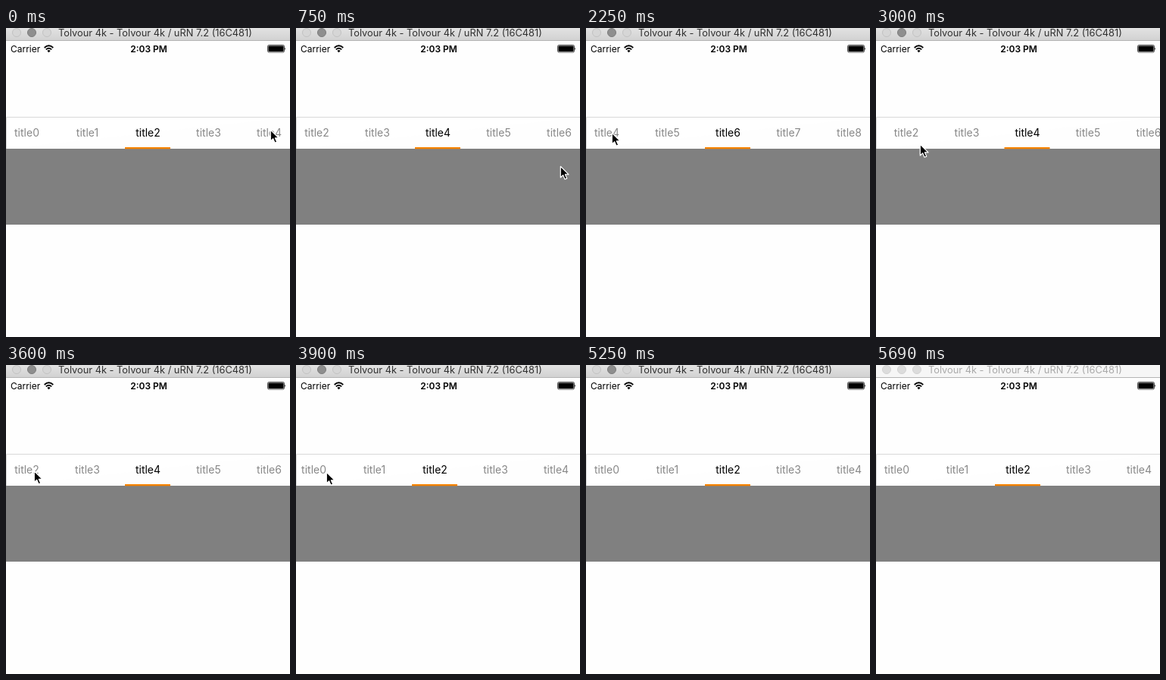
These frames come from a looping animation (375 by 407 pixels, 5.79 s). An HTML page:

```html
<!DOCTYPE html>
<html lang="en">
<head>
<meta charset="utf-8">
<title>Scrolling tabs</title>
<style>
  html, body { margin: 0; width: 100%; height: 100%; overflow: hidden; background: #fefefe; }
  svg { display: block; width: 375px; height: 407px; font-family: Inter, Roboto, sans-serif; }
  #tabs text { font-size: 14px; fill: #888; text-anchor: middle; }
  #tabs text.on { fill: #000; }
  #bar rect { fill: url(#chrome); }
  #bar text { font-size: 12.8px; fill: #303030; }
  #bar circle { fill: #d6d6d6; stroke: #c2c2c2; }
  #bar circle.mid { fill: #8e8e8e; stroke: #7c7c7c; }
  #bar.idle rect { fill: #f6f6f6; }
  #bar.idle text { fill: #a9a9a9; }
  #bar.idle circle { fill: #dcdcdc; stroke: #d2d2d2; }
</style>
</head>
<body>
<svg viewBox="0 0 375 407">
  <defs>
    <linearGradient id="chrome" x2="0" y2="1">
      <stop stop-color="#e2e2e2"/><stop offset="1" stop-color="#d2d2d2"/>
    </linearGradient>
  </defs>
  <rect width="375" height="407" fill="#fefefe"/>

  <g id="bar">
    <rect width="375" height="16"/>
    <circle cx="14" cy="6" r="5.5"/>
    <circle cx="34" cy="6" r="5.5" class="mid"/>
    <circle cx="54" cy="6" r="5.5"/>
    <text x="69" y="11">Tolvour 4k - Tolvour 4k / uRN 7.2 (16C481)</text>
    <path d="M0 16.5H375" stroke="#b4b4b4"/>
  </g>

  <g font-size="12">
    <text x="6" y="32">Carrier</text>
    <text x="188.5" y="32" text-anchor="middle" font-weight="600">2:03 PM</text>
    <g fill="none" stroke="#000" stroke-width="1.8">
      <path d="M50.7 26Q56.5 20.6 62.3 26M52.8 28.4Q56.5 25 60.2 28.4"/>
      <path d="M56.5 32.2L54.4 30Q56.5 28.2 58.6 30Z" fill="#000" stroke="none"/>
    </g>
    <rect x="345.5" y="22.5" width="22" height="9.5" rx="1.8" fill="none" stroke="#000" stroke-width=".7"/>
    <rect x="346.4" y="23.4" width="20.2" height="7.7" rx="1"/>
    <path d="M368.3 25.7q1.8 1.6 0 3.2z"/>
  </g>

  <path d="M.5 159V117.5H375" fill="#fff" stroke="#d9d9d9"/>
  <rect y="159" width="375" height="100" fill="#808080"/>
  <g id="tabs"><rect id="line" y="157" width="60" height="2.3" fill="#f68200"/></g>

  <path id="cursor" d="M.3 .3V15L3.7 11.8L6 17.2L8.7 16.1L6.4 10.9H11Z"
        stroke="#fff" stroke-width="1.2" stroke-linejoin="round"/>
</svg>
<script>
const LOOP = 5790, STEP = 150, PITCH = 80, GLIDE = 300;
const $ = id => document.getElementById(id);
const bar = $('bar'), tabs = $('tabs'), line = $('line'), cursor = $('cursor');

// [time, tab tapped]
const taps = [[300, 4], [1125, 6], [2400, 4], [3655, 2]];

const labels = Array.from({ length: 10 }, (_, i) => {
  const el = document.createElementNS('http://www.w3.org/2000/svg', 'text');
  el.textContent = 'title' + i;
  el.setAttribute('x', 27.5 + i * PITCH);
  el.setAttribute('y', 143);
  return tabs.appendChild(el);
});

const ramp = (t, from, to) => Math.min(1, Math.max(0, (t - from) / (to - from)));
const ease = p => p < .5 ? 4 * p ** 3 : 1 - 4 * (1 - p) ** 3;
const glide = (t, from, to) => ease(ramp(t, from, to));
const bump = (t, mid, half) => Math.sin(Math.PI * ramp(t, mid - half, mid + half)) ** 2;

// The pointer dips after each tap, crosses to the left, then leaves at the lower right.
function pointer(t, nudge) {
  const cross = glide(t, 1150, 2250), settle = glide(t, 3300, 3900), exit = ramp(t, 4200, 5100);
  const dips = 48 * bump(t, 750, 450) + 25 * bump(t, 1500, 450) + 15 * nudge;
  return [
    349 - 315 * cross + 24 * nudge + 6 * settle + 313 * Math.sin(exit * Math.PI / 2),
    134 + 4 * cross + dips + 3 * settle + 200 * exit ** 3.5
  ];
}

function draw(now) {
  const time = now % LOOP, t = Math.floor(time / STEP) * STEP;
  let active = 2, centre = 2;
  for (const [start, tab] of taps) {
    if (t < start) break;
    centre += (tab - active) * glide(t, start, start + GLIDE);
    active = tab;
  }
  const nudge = bump(t, 3000, 300);   // small drag of the tab strip
  tabs.setAttribute('transform', `translate(${(2 - centre) * PITCH + 12.5 * nudge})`);
  line.setAttribute('x', active * PITCH - 3);
  labels.forEach((el, i) => el.classList.toggle('on', i === active));

  cursor.setAttribute('transform', `translate(${pointer(t, nudge)})`);
  cursor.style.display = t < 5250 ? '' : 'none';
  bar.classList.toggle('idle', time >= 5690);
}

const begin = performance.now();
function tick() {
  draw(performance.now() - begin);
  requestAnimationFrame(tick);
}
tick();
</script>
</body>
</html>
```
